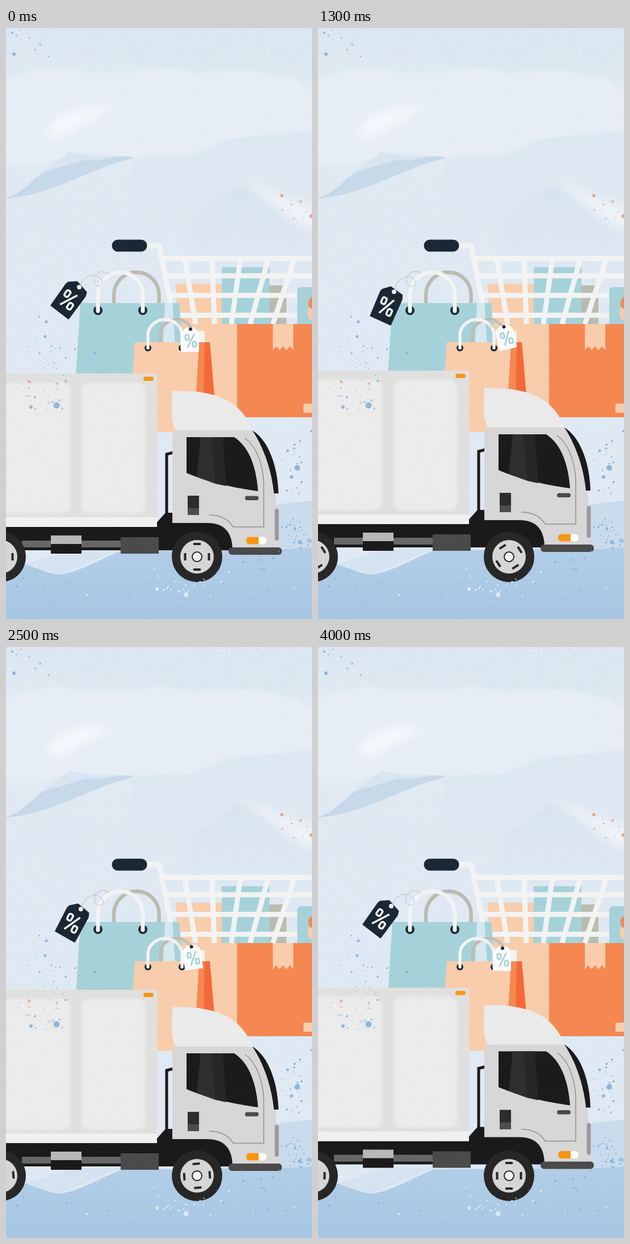
An HTML page for the animation above (4100 ms loop, 539 by 1040 pixels).

```html
<!DOCTYPE html>
<html lang="en">
<head>
<meta charset="utf-8">
<title>Delivery truck</title>
<style>
  html, body { margin: 0; width: 100%; height: 100%; overflow: hidden; background: #dfe9f4; }
  svg { display: block; width: 100vw; height: 100vh; }
</style>
</head>
<body>
<svg viewBox="0 0 539 1040" preserveAspectRatio="none">
  <defs>
    <linearGradient id="sky" x2="0" y2="1">
      <stop offset="0" stop-color="#d6e4ef"/>
      <stop offset=".14" stop-color="#dfe9f3"/>
      <stop offset=".3" stop-color="#dbe6f1"/>
      <stop offset="1" stop-color="#dae6f2"/>
    </linearGradient>
    <linearGradient id="ground" x2="0" y2="1">
      <stop offset="0" stop-color="#b1cde7"/>
      <stop offset="1" stop-color="#a5c5e2"/>
    </linearGradient>
    <linearGradient id="fade" x2="0" y2="1">
      <stop offset="0" stop-color="#d3e1ee"/>
      <stop offset="1" stop-color="#d3e1ee" stop-opacity="0"/>
    </linearGradient>
    <filter id="soft"><feGaussianBlur stdDeviation="2"/></filter>
    <filter id="haze" x="-50%" y="-50%" width="200%" height="200%"><feGaussianBlur stdDeviation="9"/></filter>
    <filter id="grain" x="0" y="0" width="100%" height="100%">
      <feTurbulence type="fractalNoise" baseFrequency=".8" numOctaves="2" seed="4"/>
      <feColorMatrix values="0 0 0 0 1  0 0 0 0 1  0 0 0 0 1  2.4 0 0 0 -1"/>
    </filter>
    <g id="wheel">
      <circle r="44.5" fill="#242424"/>
      <circle r="29.500" fill="#d5d5d5"/>
      <path d="M-6.5-22.5H6.5M-6.5 22.5H6.5M-21-6.5V6.5M21-6.5V6.5" stroke="#242424" stroke-width="4"/>
      <circle r="8.5" fill="#f2f2f2" stroke="#242424" stroke-width="2"/>
    </g>
    <g id="percent" fill="none" stroke="currentColor" stroke-width="2.700">
      <rect x="-9.500" y="-10.500" width="6" height="9" rx="2"/>
      <rect x="3.500" y="1.500" width="6" height="9" rx="2"/>
      <path d="M-6 12L6-12"/>
    </g>
  </defs>

  <!-- landscape -->
  <rect width="539" height="1040" fill="url(#sky)"/>
  <g filter="url(#soft)">
    <path d="M88 70Q110 50 150 55L300 72 420 74 539 90V0H90Z" fill="#d6e4ef" opacity=".6"/>
    <path d="M0 90Q60 70 100 71C140 80 180 80 220 78 270 68 300 70 330 80L430 74 510 92 539 112V185L390 195 330 222 222 227 120 220 60 240H0Z" fill="#e3ebf5"/>
    <path d="M222 227L330 222 390 195 539 180V340H222Z" fill="url(#fade)" opacity=".6"/>
    <path d="M330 330C355 320 380 296 410 276L470 308 539 350V450H300Z" fill="url(#fade)"/>
  </g>
  <g filter="url(#haze)" fill="#f4f7fb">
    <path d="M68 190Q80 155 112 149 140 134 185 140 160 160 130 172 105 198 68 190Z"/>
    <path d="M420 262Q480 300 545 315V360Q480 330 420 262Z" opacity=".7"/>
  </g>
  <path d="M65 254L110 218 150 225 205 226 143 236Z" fill="#d4e1ee"/>
  <path d="M0 299C30 290 45 268 65 254L143 231 160 233 200 226H222V229C205 235 190 238 170 246 120 266 60 296 0 300Z" fill="#bfd3e6"/>
  <rect width="539" height="1040" filter="url(#grain)" opacity=".5"/>
  <path d="M380 865Q450 838 539 832V940H380Z" fill="#c8dbed"/>
  <path d="M0 941C35 936 65 960 95 962 130 957 165 935 205 919L480 918 539 914V1040H0Z" fill="url(#ground)"/>
  <path d="M35 943C80 930 110 916 140 917H205Q165 932 130 947L97 962 60 951Z" fill="#cadcee" opacity=".5"/>

  <!-- cart and boxes -->
  <path d="M299 450H380V521H407V685H310Z" fill="#f8ccaa"/>
  <path d="M380 421H464V521H380Z" fill="#a4d1d9"/>
  <path d="M464 453H494V521H464Z" fill="#babaaf"/>
  <g fill="none" stroke="#f2f3f2" stroke-width="9">
    <path d="M248 383H270L297 521" stroke-linejoin="round"/>
    <path d="M273 405.500H539M280 436H539M286 470.500H539M292 505.500H539"/>
    <path d="M315 406L334 521M363 406L367 521M413 406L397 521M462 406L430 521M508 406L470 521"/>
  </g>
  <rect x="186.500" y="372.500" width="62" height="21" rx="10.500" fill="#172432"/>
  <rect x="513" y="456" width="50" height="70" rx="6" fill="#a4d1d9"/>
  <circle cx="546" cy="502" r="15" fill="#f8ccaa"/>
  <circle cx="545" cy="484" r="12.500" fill="#f5864f"/>
  <path d="M407 521H539V685H407Z" fill="#f5864f"/>
  <path d="M470 521H506V567L500 560 494 567 488 560 482 567 476 560 470 567ZM524 661H539V677H524Z" fill="#f8ccaa"/>

  <!-- shopping bags -->
  <path d="M190 486V470A39.500 40 0 0 1 269.500 470V486" fill="none" stroke="#babaaf" stroke-width="6.500"/>
  <path d="M293 484H305L312 560H298Z" fill="#a4d1d9"/>
  <path d="M280 484H293L297 560H274Z" fill="#d6e7ef"/>
  <path d="M131 484H280L272 660H120Z" fill="#a4d1d9"/>
  <g fill="#172432"><circle cx="162" cy="497" r="8"/><circle cx="241" cy="497" r="8"/></g>
  <path d="M162 498V470A39.500 40 0 0 1 241 470V498" fill="none" stroke="#f2f3f2" stroke-width="7" stroke-linecap="round"/>
  <path d="M272 554V541A28.500 28.500 0 0 1 329 541V554" fill="none" stroke="#bdbbae" stroke-width="5"/>
  <path d="M336 533H350V554H336Z" fill="#f2f3f2"/>
  <path d="M340 553H359L368 660H332Z" fill="#f5864f"/>
  <path d="M350 553H359L368 660H348Z" fill="#f46735"/>
  <path d="M227 553H340L331 711H215Z" fill="#f8ccaa"/>
  <g fill="#172432"><circle cx="250" cy="563" r="6"/><circle cx="310" cy="563" r="6"/></g>
  <path d="M250 563V541A30 28 0 0 1 310 541V563" fill="none" stroke="#f2f3f2" stroke-width="5.500" stroke-linecap="round"/>

  <g id="darkTag">
    <path d="M129 456C137 435 157 430 167 441 177 454 158 460 155 447 153 432 168 423 183 434" fill="none" stroke="#b9bfc0"/>
    <path d="M110 448L125 447 141 465 139 472 110 511 80 488 106 451Z" fill="#172432" stroke="#172432" stroke-width="3" stroke-linejoin="round"/>
    <circle cx="129" cy="456" r="4" fill="#f2f3f2"/>
    <use href="#percent" transform="translate(110.5 478.5) rotate(36) scale(1.28)" color="#fff"/>
  </g>
  <g id="lightTag">
    <path d="M325 530C320 516 306 510 302 519 300 529 313 529 309 516" fill="none" stroke="#c8cccb"/>
    <path d="M318 528H332L339 536V569H309V536Z" fill="#fafafa" stroke="#fafafa" stroke-width="2" stroke-linejoin="round"/>
    <circle cx="325" cy="530" r="3" fill="#172432"/>
    <use href="#percent" transform="translate(325.5 550.5)" color="#a4d1d9"/>
  </g>

  <!-- truck -->
  <g id="truck">
    <path d="M0 876H294V866H360Q402 878 402 919H0Z" fill="#171717"/>
    <path d="M264 872L281 853H295V880H264Z" fill="#171717"/>
    <path d="M28 902H202V914H28Z" fill="#656565"/>
    <path d="M79 893H133V909H79Z" fill="#b6b6b6"/>
    <path d="M79 908H133V925H79Z" fill="#171717"/>
    <path d="M202 896H269V925H202Z" fill="#484848"/>
    <path d="M295 747L283 750V858" fill="none" stroke="#171717" stroke-width="5"/>
    <path d="M0 608H266V878H0Z" fill="#dfdfde"/>
    <g fill="#ebebeb" filter="url(#soft)">
      <rect x="-40" y="624" width="153" height="230" rx="14"/>
      <rect x="133" y="624" width="112" height="230" rx="14"/>
    </g>
    <path d="M0 861H266V878H0Z" fill="#f0f0ef"/>
    <rect x="242" y="613.500" width="18" height="7.500" rx="3.700" fill="#f7930f"/>

    <path d="M293 639C365 637 412 652 435 709H300Q293 700 292 680Z" fill="#eaeaea"/>
    <path d="M293 720Q293 708 305 708H434C460 740 475 790 477 850L482 916H399C398 885 382 871 355 871H293Z" fill="#d6d6d6"/>
    <path d="M434 708C460 724 478 765 480 819H472C468 780 455 740 434 708Z" fill="#171717"/>
    <path d="M318 720H402C425 735 440 765 444 815 405 810 352 798 318 783Z" fill="#181818"/>
    <path d="M343 720H362L369 802 336 790Z" fill="#2c2c2c"/>
    <path d="M362 720H382L388 806 369 802Z" fill="#242424"/>
    <path d="M421 722C440 735 452 765 454 800V878H400Q387 857 358 857" fill="none" stroke="#8f8f8f" stroke-width="1.500"/>
    <rect x="421" y="823.500" width="24" height="7.500" rx="3.700" fill="#484848"/>
    <path d="M320 823H340V857H320Z" fill="#2a2a2a"/>
    <path d="M320 845H340V857H320Z" fill="#4a4a4a"/>
    <rect x="473.500" y="846" width="7" height="56" rx="3.500" fill="#989898"/>
    <rect x="423" y="895.500" width="36" height="13" rx="6" fill="#fff"/>
    <path d="M445 895.500H429Q423 895.500 423 902T429 908.500H445Z" fill="#f7930f"/>
    <rect x="392" y="914" width="94" height="13" rx="6" fill="#484848"/>
  </g>
  <use id="rearWheel" href="#wheel"/>
  <use id="frontWheel" href="#wheel"/>

  <g id="splatter"></g>
  <rect y="370" width="539" height="670" filter="url(#grain)" opacity=".06"/>
</svg>

<script>
const el = id => document.getElementById(id);
const BLUE = '#6fa3d3', ORANGE = '#ee8f66', WHITE = '#eef4fa';
const LOOP = 4100, STEP = 100;

let seed = 11;
const random = () => (seed = seed * 16807 % 2147483647) / 2147483647;
const spread = () => random() + random() - 1;

function dot(color, x, y, r, opacity = .75) {
  const c = document.createElementNS('http://www.w3.org/2000/svg', 'circle');
  const attrs = { cx: x, cy: y, r, fill: color, opacity };
  for (const name in attrs) c.setAttribute(name, attrs[name]);
  el('splatter').append(c);
}

// colour, centre, half size, count
[
  [BLUE, 30, 22, 60, 38, 14], [BLUE, 80, 580, 80, 80, 34],
  [BLUE, 80, 650, 60, 32, 20], [BLUE, 515, 760, 40, 80, 34],
  [BLUE, 512, 895, 42, 45, 48], [BLUE, 450, 955, 90, 40, 18],
  [BLUE, 90, 985, 90, 40, 14], [ORANGE, 515, 325, 35, 42, 18],
  [ORANGE, 45, 630, 55, 35, 12], [WHITE, 440, 30, 90, 45, 45],
  [WHITE, 320, 985, 190, 50, 60]
].forEach(([color, x, y, w, h, n]) => {
  while (n--) dot(color, x + spread() * w, y + spread() * h, .5 + 1.6 * random() ** 2);
});
[
  [BLUE, 89, 664, 5.5], [BLUE, 44, 667, 3], [BLUE, 71, 517, 2.5], [BLUE, 69, 543, 2.5],
  [BLUE, 156, 572, 2], [BLUE, 14, 46, 3], [BLUE, 513, 774, 5], [BLUE, 503, 790, 3],
  [BLUE, 496, 744, 2.5], [BLUE, 517, 905, 3], [ORANGE, 486, 295, 3],
  [ORANGE, 538, 331, 3.5], [ORANGE, 40, 622, 2], [WHITE, 317, 997, 4], [WHITE, 266, 987, 3]
].forEach(d => dot(...d));

// body height over time, in seconds and pixels
const bounce = [[0, 0], [.5, -7], [.9, -4.5], [1.3, -5], [1.65, -6.5], [2, -5.8],
  [2.5, -5], [2.85, -6.2], [3.2, -5.4], [3.6, -4.8], [4, -8.5], [4.1, 0]];

function bodyOffset(t) {
  const i = bounce.findIndex(([time]) => time > t);
  const [t0, y0] = bounce[i - 1], [t1, y1] = bounce[i];
  return y0 + (y1 - y0) * (1 - Math.cos(Math.PI * (t - t0) / (t1 - t0))) / 2;
}

function draw(now) {
  const t = Math.floor(now % LOOP / STEP) * STEP / 1000;
  const swing = -8 * (1 - Math.cos(Math.PI * t));
  const spin = 180 * t - 4 * Math.sin(Math.PI * t);
  const transform = (id, value) => el(id).setAttribute('transform', value);
  transform('darkTag', `rotate(${swing} 168 438)`);
  transform('lightTag', `rotate(${swing} 308 517)`);
  transform('truck', `translate(0 ${bodyOffset(t)})`);
  transform('rearWheel', `translate(-9.5 930.5) rotate(${spin})`);
  transform('frontWheel', `translate(336.5 930.5) rotate(${spin})`);
}

function frame() {
  draw(performance.now());
  requestAnimationFrame(frame);
}
frame();
</script>
</body>
</html>
```
